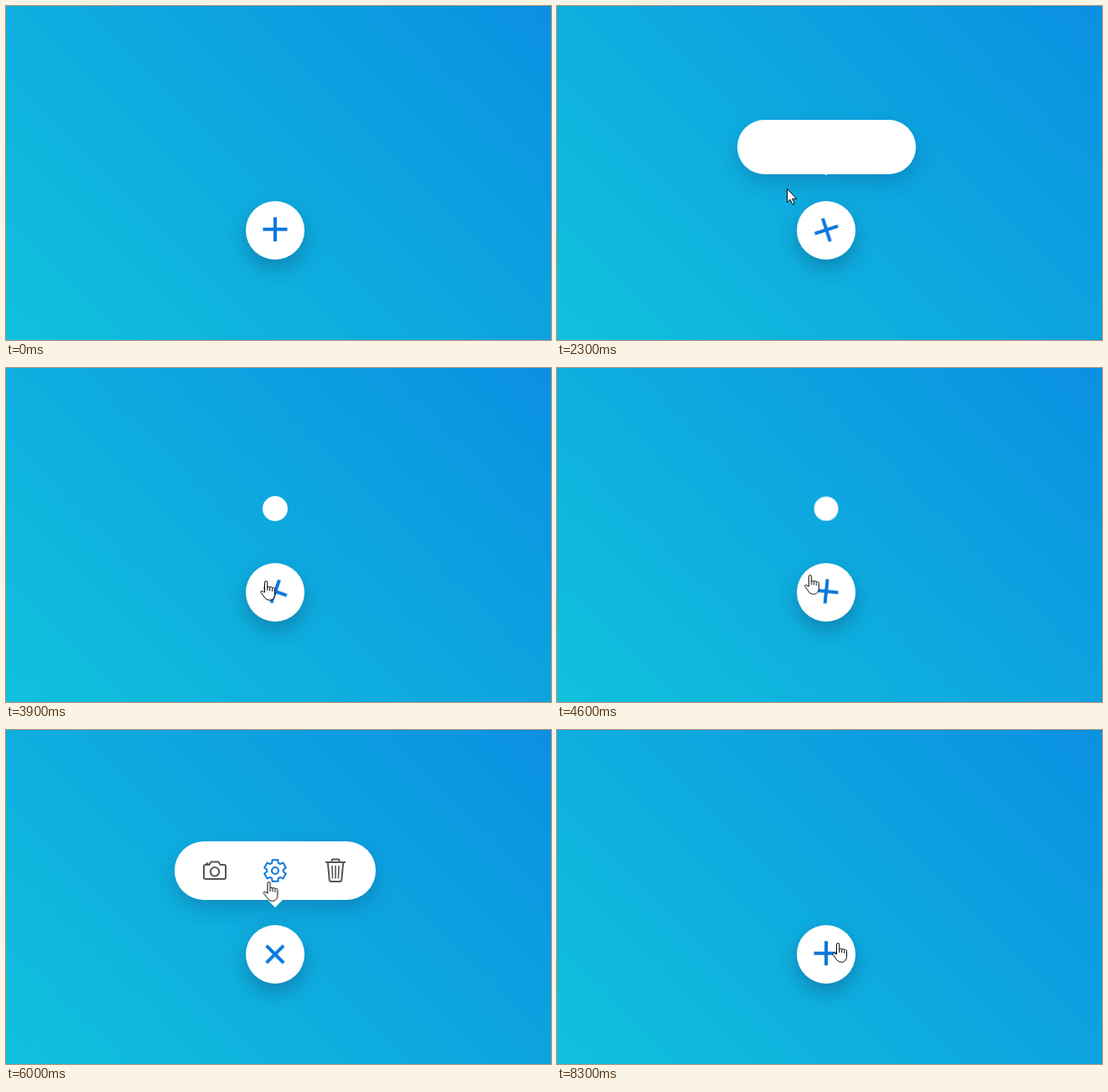
An HTML page for the animation above (8.4 s loop, 650 by 399 pixels).

```html
<!DOCTYPE html>
<html lang="en">
<head>
<meta charset="utf-8">
<title>Floating menu</title>
<style>
  html, body { margin: 0; width: 100%; height: 100%; overflow: hidden; }
  body {
    position: relative;
    background: linear-gradient(45deg, #11c1dc, #0a90e2);
    --blue: #0a78dc;
    --grey: #555;
  }
  .button, .panel, .tail, svg { position: absolute; }
  svg { left: 0; top: 0; overflow: visible; }

  /* Every track shares the same 8.4 s loop. */
  .panel, .tail, .plus, .icon, .cursor, .arrow, .hand {
    animation: 8400ms linear infinite both;
  }

  .button {
    left: 286px; top: 233px; width: 70px; height: 70px;
    border-radius: 50%;
    background: #fff;
    box-shadow: 0 10px 22px rgba(16, 39, 80, .3);
  }
  .plus {
    fill: none; stroke: var(--blue); stroke-width: 4;
    transform-origin: 320.7px 267.3px;
    animation-name: spin;
    animation-timing-function: ease;
  }
  @keyframes spin {
    0%, 23.69%, 51.67%, 54.05%, 99.17%, 100% { transform: rotate(0deg); }
    35.6%, 39.76%, 65.95%, 87.26% { transform: rotate(135deg); }
  }

  .panel {
    border-radius: 35px;
    background: #fff;
    animation-name: pop, stretch;
    animation-timing-function: ease;
  }
  @keyframes pop {
    0%, 23.69%, 48.81%, 54.05%, 96.31%, 100% { transform: scale(0); }
    24.64%, 46.9%, 55%, 94.4% { transform: scale(1); }
  }
  @keyframes stretch {
    0%, 24.64%, 46.31%, 55%, 93.81%, 100% {
      left: 306px; top: 153px; width: 30px; height: 30px;
      box-shadow: 0 10px 22px rgba(16, 39, 80, 0);
    }
    29.4%, 42.97%, 59.76%, 90.47% {
      left: 201px; top: 133px; width: 240px; height: 70px;
      box-shadow: 0 10px 22px rgba(16, 39, 80, .22);
    }
  }
  .tail {
    left: 50%; top: 50%; width: 14px; height: 14px; margin: -7px;
    background: #fff;
    animation-name: drop;
    animation-timing-function: ease;
  }
  @keyframes drop {
    0%, 25.24%, 45.12%, 55.6%, 92.62%, 100% { transform: translateY(0) rotate(45deg); }
    30.24%, 42.14%, 60.6%, 89.64% { transform: translateY(34px) rotate(45deg); }
  }

  .icon {
    fill: none; stroke: var(--grey); stroke-width: 2;
    stroke-linejoin: round;
    animation-name: show, var(--hover);
    animation-timing-function: linear, step-end;
    animation-delay: var(--lag), 0s;
  }
  .camera { --hover: hover-camera; --lag: 0ms; }
  .gear { --hover: hover-gear; --lag: 60ms; }
  .trash { --hover: hover-trash; --lag: 120ms; }
  @keyframes show {
    0%, 29.64%, 42.14%, 60%, 89.64%, 100% { opacity: 0; }
    32.02%, 40.71%, 62.38%, 88.21% { opacity: 1; }
  }
  @keyframes hover-camera {
    0%, 68.79%, 100% { stroke: var(--grey); }
    64.76% { stroke: var(--blue); }
  }
  @keyframes hover-gear {
    0%, 72.14%, 80.68%, 100% { stroke: var(--grey); }
    70.75%, 77.99% { stroke: var(--blue); }
  }
  @keyframes hover-trash {
    0%, 76.31%, 100% { stroke: var(--grey); }
    72.93% { stroke: var(--blue); }
  }

  .cursor {
    fill: #fff; stroke: #000; stroke-linejoin: round;
    animation-name: move, enter;
    animation-timing-function: linear, step-end;
  }
  @keyframes move {
    0%, 2.38% { transform: translate(0, 36px); }
    11.9% { transform: translate(180px, 150px); }
    20.24%, 22.62% { transform: translate(303px, 260px); }
    27.38% { transform: translate(274px, 218px); }
    32.74% { transform: translate(271px, 220px); }
    36.9%, 53.57% { transform: translate(309px, 254px); }
    59.52% { transform: translate(268px, 219px); }
    63.1% { transform: translate(262px, 215px); }
    65.24% { transform: translate(250px, 180px); }
    67.86% { transform: translate(254px, 178px); }
    71.43% { transform: translate(312px, 181px); }
    73.81%, 74.4% { transform: translate(409px, 181px); }
    78.57%, 80% { transform: translate(330px, 180px); }
    86.31%, 100% { transform: translate(334px, 254px); }
  }
  @keyframes enter {
    0% { opacity: 0; }
    2.38%, 100% { opacity: 1; }
  }
  .arrow, .hand { animation-timing-function: step-end; }
  .arrow { animation-name: arrow; }
  .hand { animation-name: hand; }
  @keyframes arrow {
    0%, 24.1%, 55.36%, 68.79%, 72.14%, 76.31%, 80.68% { opacity: 1; }
    19.45%, 35.6%, 64.76%, 70.75%, 72.93%, 77.99%, 84.9%, 100% { opacity: 0; }
  }
  @keyframes hand {
    0%, 24.1%, 55.36%, 68.79%, 72.14%, 76.31%, 80.68% { opacity: 0; }
    19.45%, 35.6%, 64.76%, 70.75%, 72.93%, 77.99%, 84.9%, 100% { opacity: 1; }
  }
</style>
</head>
<body>
  <div class="button"></div>
  <div class="panel"><div class="tail"></div></div>

  <svg width="650" height="399">
    <path class="plus" d="M306.5 266.7h29M321 252.2v29"/>

    <g class="icon camera">
      <path d="M238 161h4.5l2.2-3.5h8.6l2.2 3.5h4.5q2 0 2 2v13q0 2-2 2h-22q-2 0-2-2v-13q0-2 2-2zM238.5 159.5h3"/>
      <circle cx="249" cy="169.3" r="5.2"/>
    </g>
    <g class="icon gear">
      <path id="cog" transform="translate(321 168)"/>
      <circle cx="321" cy="168" r="4"/>
    </g>
    <g class="icon trash">
      <path d="M381 158h24M388.5 157.5v-1.5q0-1.5 1.5-1.5h6q1.5 0 1.5 1.5v1.5M383.8 158l1.9 21q.2 2 2.2 2h10.2q2 0 2.2-2l1.9-21"/>
      <path stroke-width="1.6" d="M389 162l.6 15.500M393 162v15.500M397 162l-.6 15.500"/>
    </g>

    <g class="cursor">
      <path class="arrow" d="M.5.5V16.500L4.200 13.200 6.800 19 9.200 18 6.700 12.200H11.800Z"/>
      <g class="hand" transform="translate(-6 0)">
        <path d="M5.500 14V2.200a1.600 1.600 0 0 1 3.200 0V8.500a1.500 1.500 0 0 1 3 .3a1.500 1.500 0 0 1 3 .5a1.500 1.500 0 0 1 2.800 1V16c0 4-2 7.300-6 7.300-4 0-5.500-2-6.800-4.300L1 14.200c-.8-1.600 1-2.600 2.300-1.400z"/>
        <path fill="none" d="M8.700 8.500V12M11.700 9v3.300M14.700 9.800v3"/>
      </g>
    </g>
  </svg>

<script>
  // Six-toothed outline: each tooth is [radius, angle offset] around its axis.
  const tooth = [[9.8, -23], [13.3, -15], [13.3, 15], [9.8, 23]];
  const points = [];
  for (let axis = 30; axis < 390; axis += 60) {
    for (const [r, offset] of tooth) {
      const a = (axis + offset) * Math.PI / 180;
      points.push(`${(r * Math.cos(a)).toFixed(2)} ${(r * Math.sin(a)).toFixed(2)}`);
    }
  }
  document.getElementById('cog').setAttribute('d', `M${points.join('L')}Z`);
</script>
</body>
</html>
```
